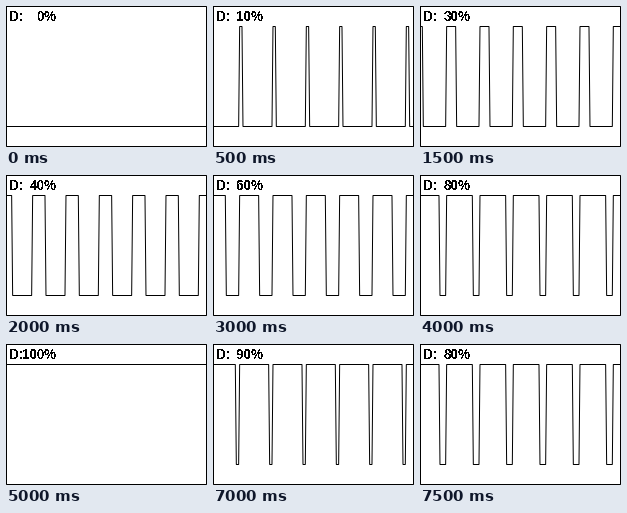
A matplotlib script for the animation above (8000 ms loop, 201x141 px).

```python
import matplotlib.pyplot as plt
from matplotlib.animation import FuncAnimation

W, H, DPI = 201, 141, 64
PX = 72 / DPI                    # one pixel in points
HIGH, LOW = 20, 120
PERIOD = 200 / 6
RISE_X, RAMP = 25.15, 1
# duty cycle in percent, one step per half second
DUTY = [*range(0, 100, 10)] + [100] * 4 + [90, 80]

fig = plt.figure(figsize=(W / DPI, H / DPI), dpi=DPI, facecolor="white")
ax = fig.add_axes([0, 0, 1, 1])
ax.set(xlim=(0, W), ylim=(H, 0))
ax.axis("off")


def stroke(xs, ys):
    line, = ax.plot(xs, ys, color="black", lw=PX, snap=False,
                    solid_joinstyle="miter", solid_capstyle="projecting")
    return line


def label(x, text, align):
    return ax.text(x, 15, text, ha=align, va="baseline", color="black",
                   family="Liberation Sans", weight="bold",
                   size=13.5 * PX, antialiased=False)


def wave(duty):
    """Corner points of the pulse train, on pixel centres."""
    if duty in (0, 100):
        y = LOW if duty == 0 else HIGH
        return [0.5, W - 0.5], [y + 0.5] * 2
    xs, ys = [], []
    for k in range(-1, 7):
        rise = RISE_X + k * PERIOD + 0.5
        fall = rise + PERIOD * duty / 100
        xs += [rise, rise + RAMP, fall, fall + RAMP]
        ys += [LOW + 0.5, HIGH + 0.5, HIGH + 0.5, LOW + 0.5]
    return xs, ys


stroke([0.5, W - 0.5, W - 0.5, 0.5, 0.5], [0.5, 0.5, H - 0.5, H - 0.5, 0.5])
signal = stroke([], [])
label(3, "D:", "left")
number = label(38.5, "", "right")
label(38, "%", "left")


def update(i):
    duty = DUTY[i % len(DUTY)]
    signal.set_data(*wave(duty))
    number.set_text(str(duty))
    return signal, number


anim = FuncAnimation(fig, update, frames=len(DUTY), interval=500,
                     repeat=True, repeat_delay=0, blit=False)
plt.show()
```
